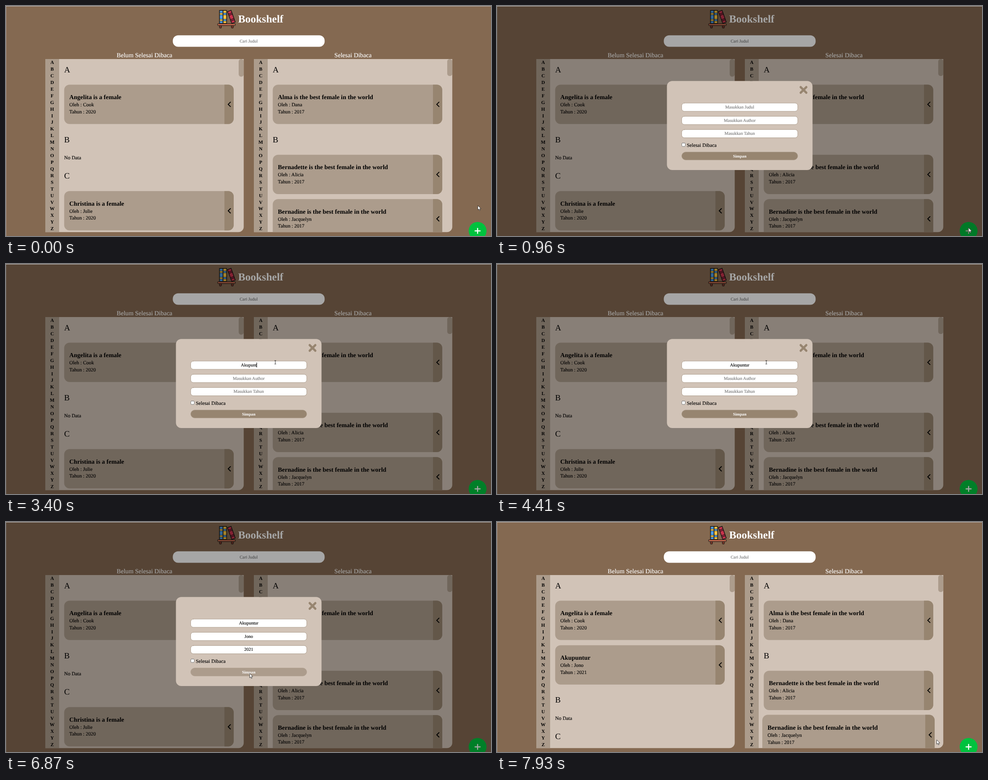
Write an HTML page with a canvas that moves like this. It is 1086 px wide and 516 px high and loops after 8 s.

```html
<!DOCTYPE html>
<html lang="id">
<head>
<meta charset="utf-8">
<title>Bookshelf</title>
<style>
html, body { margin: 0; width: 100%; height: 100%; overflow: hidden; background: #846951; }
canvas { display: block; }
</style>
</head>
<body>
<canvas id="stage" width="1086" height="516"></canvas>
<script>
const ctx = document.getElementById('stage').getContext('2d');
const LOOP = 8000;
const OPEN = 960, SAVE = 7020;
const BROWN = '#846951', PALE = '#d1c3b7', CARD = '#ac9c8c', DARK = '#978570', GREEN = '#00c23e';
const SERIF = '"Liberation Serif", "Times New Roman", serif';

// [start, x, y, shape]; a: arrow tip, i: centre of the text cursor
const pointer = [
  [0, 1056.5, 448, 'a'], [130, 1050, 438, 'a'], [280, 1046, 434, 'a'], [410, 1045, 452, 'a'],
  [540, 1048, 474, 'a'], [690, 1052, 490, 'a'], [820, 1056, 498, 'a'], [1090, 940, 439, 'a'],
  [1230, 800, 330, 'a'], [1360, 690, 265, 'a'], [1490, 613, 227.5, 'i'], [1630, 605, 217.5, 'i'],
  [1760, 603, 220.5, 'i'], [1900, 606, 219, 'i'], [2030, 603, 220.5, 'i'], [6200, 590, 242, 'i'],
  [6330, 545, 278, 'i'], [6470, 541, 318, 'a'], [6600, 543, 341, 'a'], [6720, 542, 342, 'a'],
  [6870, 545.5, 340, 'a'], [7430, 541, 355, 'a'], [7550, 548, 346, 'a'], [7690, 680, 201, 'a'],
  [7810, 930, 440, 'a'], [7930, 984.5, 489, 'a']
];

// typed: [start, number of letters]; caret: [from, to]
const fields = [
  { y: 217.8, hint: 'Masukkan Judul', word: 'Akupuntur', caret: [[1900, 2460], [2610, 3850]],
    typed: [[0, 0], [2610, 1], [2740, 2], [2870, 3], [3000, 4], [3270, 6], [3400, 7], [3550, 8], [3710, 9]] },
  { y: 247.5, hint: 'Masukkan Author', word: 'Jono', caret: [[3850, 4410], [4680, 5080]],
    typed: [[0, 0], [4680, 1], [4800, 3], [4930, 4]] },
  { y: 277.2, hint: 'Masukkan Tahun', word: '2021', caret: [[5080, 6200]],
    typed: [[0, 0], [5490, 1], [5610, 3], [5760, 4]] }
];

const finished = [
  { head: 'A', y: 142 }, { book: ['Alma is the best female in the world', 'Dana', 2017], y: 176.5 },
  { head: 'B', y: 299 }, { book: ['Bernadette is the best female in the world', 'Alicia', 2017], y: 333.7 },
  { book: ['Bernadine is the best female in the world', 'Jacquelyn', 2017], y: 433.3, hover: true }
];

function unfinished(saved) {
  const d = saved ? 99.7 : 0;
  const list = [
    { head: 'A', y: 142 }, { book: ['Angelita is a female', 'Cook', 2020], y: 176.5 },
    { head: 'B', y: 299 + d }, { note: 'No Data', y: 344 + d }, { head: 'C', y: 380.7 + d },
    { book: ['Christina is a female', 'Julie', 2020], y: 415.3 + d }
  ];
  if (saved) list.push({ book: ['Akupuntur', 'Jono', 2021], y: 276.5 });
  return list;
}

const latest = (keys, t) => keys.filter(k => k[0] <= t).pop();

function box(x, y, w, h, r, fill, stroke, width = 1) {
  ctx.beginPath();
  ctx.roundRect(x, y, w, h, r);
  ctx.fillStyle = fill;
  ctx.fill();
  if (stroke) {
    ctx.strokeStyle = stroke;
    ctx.lineWidth = width;
    ctx.stroke();
  }
}

function text(str, x, y, size, color = '#000', align = 'left', bold = false) {
  ctx.font = `${bold ? 'bold ' : ''}${size}px ${SERIF}`;
  ctx.textAlign = align;
  ctx.fillStyle = color;
  ctx.fillText(str, x, y);
  if (!bold && size < 16) {
    ctx.strokeStyle = color;
    ctx.lineWidth = 0.15;
    ctx.strokeText(str, x, y);
  }
}

function line(points, color, width, cap = 'butt') {
  ctx.beginPath();
  points.forEach(([x, y]) => ctx.lineTo(x, y));
  ctx.strokeStyle = color;
  ctx.lineWidth = width;
  ctx.lineCap = cap;
  ctx.stroke();
}

function spine(x, y, w, h, color, band) {
  box(x, y, w, h, 1, color);
  ctx.fillStyle = band;
  for (const f of [0.2, 0.68]) {
    ctx.fillRect(x, y + h * f, w, h * 0.14);
    line([[x, y + h * f], [x + w, y + h * f]], '#111', 0.8);
    line([[x, y + h * (f + 0.14)], [x + w, y + h * (f + 0.14)]], '#111', 0.8);
  }
  ctx.lineWidth = 1.4;
  ctx.strokeRect(x, y, w, h);
}

function books() {
  spine(478, 10, 8, 29, '#4d9be6', '#f6c445');
  spine(486, 10, 8, 29, '#f6c445', '#4d9be6');
  ctx.save();
  ctx.translate(496, 12.5);
  ctx.rotate(-0.34);
  spine(0, 0, 8.5, 28, '#c9344c', '#8f2238');
  ctx.restore();
  box(478, 43.5, 4.5, 6, 1, '#7d3b2c', '#111');
  box(504.5, 43.5, 4.5, 6, 1, '#7d3b2c', '#111');
  box(473.8, 39.5, 39.8, 4.5, 1.5, '#b5634a', '#111');
}

function bookCard(x, y, [title, author, year], zoom) {
  ctx.save();
  ctx.translate(x + 190, y + 44);
  ctx.scale(zoom, zoom);
  ctx.translate(-190, -44);
  box(0, 0, 379.5, 88.3, 12, CARD);
  box(358.8, 0, 20.7, 88.3, [0, 12, 12, 0], DARK);
  line([[372.8, 38.7], [367.2, 44.2], [372.8, 49.7]], '#000', 1.8);
  text(title, 11.5, 32.7, 13.95, '#000', 'left', true);
  text('Oleh : ' + author, 11.5, 48.6, 11.25);
  text('Tahun : ' + year, 11.5, 64, 11.25);
  ctx.restore();
}

function panel(x, title, list, thumb, zoom) {
  text(title, x + 222, 115.3, 14.1, '#fff', 'center');
  ctx.save();
  ctx.beginPath();
  ctx.roundRect(x, 119, 444.3, 388.3, [0, 0, 12, 0]);
  ctx.clip();
  ctx.fillStyle = PALE;
  ctx.fillRect(x, 119, 445, 389);
  ctx.fillStyle = CARD;
  ctx.fillRect(x, 119, 31, 389);
  for (let i = 0; i < 26; i++) {
    text(String.fromCharCode(65 + i), x + 15.3, 130.2 + i * 14.92, 10.8, '#000', 'center', true);
  }
  for (const item of list) {
    if (item.head) text(item.head, x + 42.3, item.y + 6.5, 18.4);
    else if (item.note) text(item.note, x + 42.3, item.y, 11.3);
    else bookCard(x + 42.3, item.y, item.book, item.hover ? zoom : 1);
  }
  box(x + 433, 119, 11.3, thumb, 5.5, CARD);
  ctx.restore();
}

function addButton(hover) {
  ctx.beginPath();
  ctx.arc(1056, 504.5, 20, 0, Math.PI * 2);
  ctx.fillStyle = hover ? '#00b93c' : GREEN;
  ctx.fill();
  const ink = hover ? PALE : '#fff';
  line([[1050.4, 504.5], [1061.6, 504.5]], ink, 2.4, 'round');
  line([[1056, 498.9], [1056, 510.1]], ink, 2.4, 'round');
}

function page(t) {
  const saved = t >= SAVE;
  const zoom = t >= 7930 ? 1.017 : t >= 7810 ? 1.006 : 1;
  ctx.fillStyle = BROWN;
  ctx.fillRect(0, 0, 1086, 516);
  ctx.fillStyle = '#a39183';
  ctx.fillRect(0, 0, 1, 516);
  books();
  text('Bookshelf', 519.7, 36.7, 24, '#fff', 'left', true);
  box(373.5, 65.7, 340, 25.7, 12, '#fff');
  text('Cari Judul', 543.5, 82, 9.75, '#757575', 'center');
  panel(88, 'Belum Selesai Dibaca', unfinished(saved), saved ? 38.3 : 39.5, 1);
  panel(555, 'Selesai Dibaca', finished, 38, zoom);
  addButton(t >= 690 && t < 1090);
}

function field({ y, hint, word, typed, caret }, t) {
  box(413.6, y, 259.8, 18.4, 6, '#fff', DARK, 0.7);
  const shown = word.slice(0, latest(typed, t)[1]);
  text(shown || hint, 543.5, y + 12.2, shown ? 10 : 9.85, shown ? '#000' : '#757575', 'center');
  if (caret.some(([a, b]) => t >= a && t < b)) {
    const half = shown ? ctx.measureText(shown).width / 2 : 0;
    ctx.fillStyle = '#000';
    ctx.fillRect(Math.round(543 + half), Math.round(y + 3), 1, 11);
  }
}

function dialog(t) {
  ctx.fillStyle = 'rgba(0,0,0,.35)';
  ctx.fillRect(0, 0, 1086, 516);
  box(380.5, 168.3, 326, 199.7, 12, PALE);
  line([[680, 182], [692.6, 194.6]], DARK, 5, 'round');
  line([[692.6, 182], [680, 194.6]], DARK, 5, 'round');
  fields.forEach(f => field(f, t));
  box(413.9, 307.4, 7.6, 7.6, 1.5, '#fff', '#767676');
  text('Selesai Dibaca', 425, 316.3, 11.3);
  box(413.6, 327.6, 259.8, 17.8, 8.9, t >= 6600 ? CARD : DARK, CARD, 0.7);
  text('Simpan', 543.5, 339.8, 9.2, '#fff', 'center', true);
}

function arrow(x, y) {
  ctx.beginPath();
  [[0, 0], [0, 9.4], [2.2, 7.4], [3.8, 11], [5.4, 10.3], [3.9, 6.9], [6.8, 6.8]]
    .forEach(([dx, dy]) => ctx.lineTo(x + dx, y + dy));
  ctx.closePath();
  ctx.fillStyle = '#fff';
  ctx.fill();
  ctx.strokeStyle = '#222';
  ctx.lineWidth = 0.8;
  ctx.stroke();
}

function textCursor(x, y) {
  line([[x, y - 4], [x, y + 4]], '#333', 1);
  line([[x - 2, y - 4], [x + 2, y - 4]], '#333', 0.8);
  line([[x - 2, y + 4], [x + 2, y + 4]], '#333', 0.8);
}

function draw() {
  const t = performance.now() % LOOP;
  ctx.textRendering = 'geometricPrecision';
  page(t);
  if (t >= OPEN && t < SAVE) dialog(t);
  ctx.fillStyle = '#bcb8b5';
  ctx.fillRect(0, 0, 1086, 1);
  const [, x, y, shape] = latest(pointer, t);
  (shape === 'a' ? arrow : textCursor)(x, y);
  requestAnimationFrame(draw);
}

draw();
</script>
</body>
</html>
```
